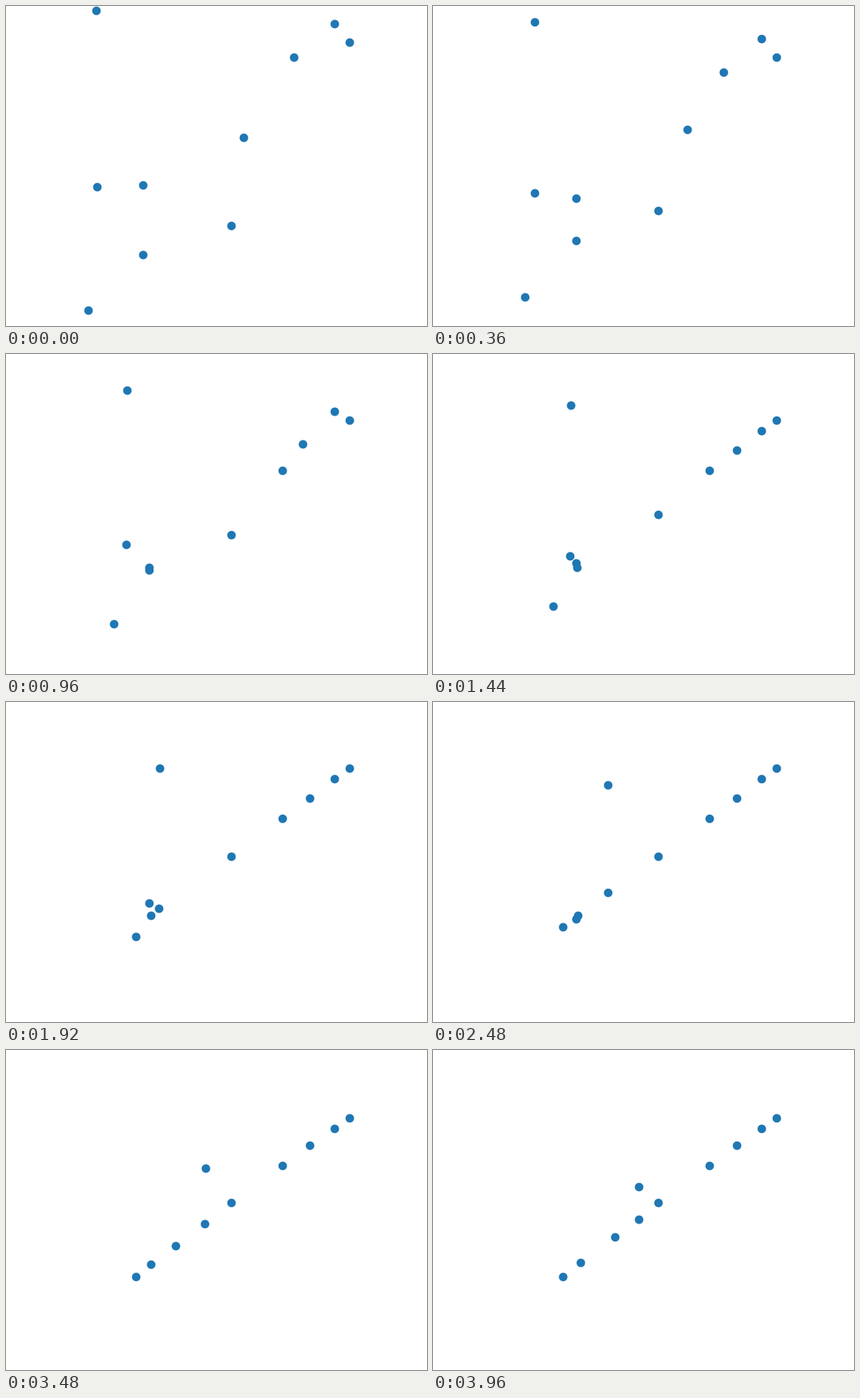
These frames come from a looping animation (477 px wide and 363 px high, 4 s). A matplotlib script:

```python
import numpy as np
import matplotlib.pyplot as plt
from matplotlib.animation import FuncAnimation
from matplotlib.patches import Circle

W, H, DPI = 477, 363, 100
FRAMES, INTERVAL = 100, 40

# Each dot: waypoints (step, x, y), then the height of its jitter once settled.
DOTS = [
    ([(0, 102, 5), (24, 137, 41), (48, 174, 75), (62, 198, 94),
      (75, 218, 113), (99, 233, 155)], 0),
    ([(0, 93, 345), (45, 147, 271), (54, 147, 255)], 2),
    ([(0, 103, 205), (9, 115, 212), (24, 136, 216), (42, 164, 236),
      (48, 173, 234), (62, 198, 216), (75, 217, 202), (99, 233, 192)], 0),
    ([(0, 155, 203), (9, 162, 218), (22, 162, 242), (48, 164, 242),
      (62, 164, 242), (75, 177, 233), (99, 206, 212)], 0),
    ([(0, 155, 282), (9, 162, 266), (20, 162, 245), (26, 162, 245),
      (48, 162, 228), (58, 162, 246)], -2),
    ([(0, 255, 249), (40, 255, 175)], -2),
    ([(0, 269, 149), (9, 288, 140), (20, 313, 132)], -1),
    ([(0, 326, 58), (9, 329, 75), (24, 336, 102), (29, 344, 109)], -1),
    ([(0, 372, 20), (36, 372, 87)], 2),
    ([(0, 389, 41), (18, 389, 75)], 2),
]
FOLLOWER, FOLLOW_START = 4, 80


def position(i, n):
    path, jitter = DOTS[i]
    steps, xs, ys = zip(*path)
    x = np.interp(n, steps, xs)
    y = np.interp(n, steps, ys)
    if n > steps[-1] and n % 2:
        y += jitter
    if i == FOLLOWER and n > FOLLOW_START:
        pull = (n - FOLLOW_START) / (FRAMES - 1 - FOLLOW_START)
        x += 5 * pull
        y -= 3 * pull
    return np.rint(x) + 0.5, np.rint(y) + 0.5


# The small margin keeps the pixel size from being rounded down.
fig = plt.figure(figsize=((W + 0.01) / DPI, (H + 0.01) / DPI), dpi=DPI,
                 facecolor="white")
ax = fig.add_axes([0, 0, 1, 1])
ax.set_xlim(0, W)
ax.set_ylim(H, 0)
ax.axis("off")

radius = 3.5 * DPI / 72
dots = [ax.add_patch(Circle(position(i, 0), radius, fc="#1f77b4", lw=0))
        for i in range(len(DOTS))]


def draw(n):
    for i, dot in enumerate(dots):
        dot.center = position(i, n)
    return dots


anim = FuncAnimation(fig, draw, frames=FRAMES, interval=INTERVAL,
                     repeat=True, repeat_delay=0, blit=False)
plt.show()
```
